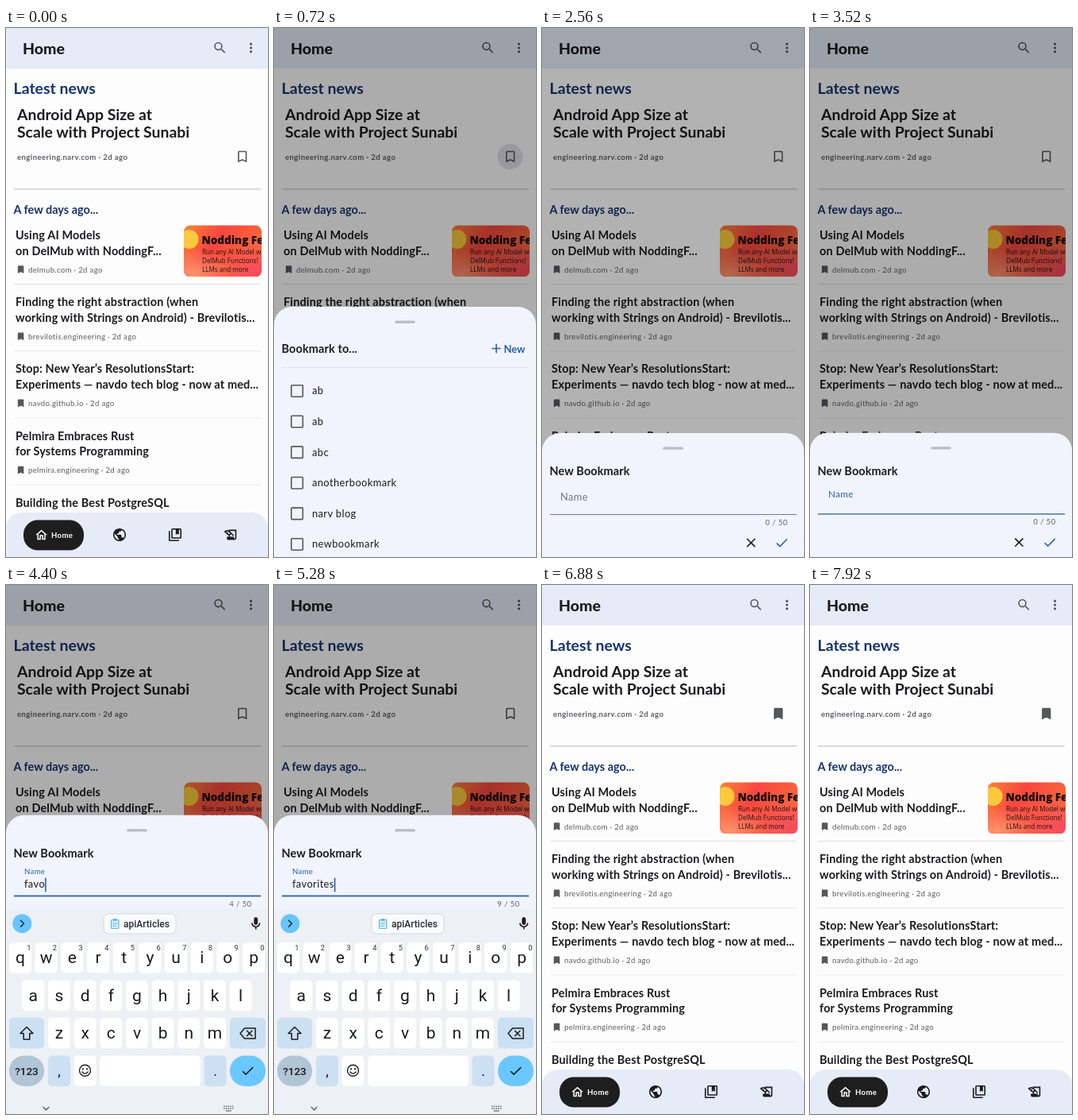
Animation, 330 px wide and 666 px high, one loop 8 s. Source, as an HTML page:

```html
<!DOCTYPE html>
<html lang="en">
<head>
<meta charset="utf-8">
<title>Bookmark flow</title>
<style>
  html, body { margin: 0; width: 100%; height: 100%; overflow: hidden; background: #fdfdfd; }
  svg { display: block; width: 330px; height: 666px; }
  text { font-family: Lato, sans-serif; white-space: pre; }
  .kb text { font-family: Roboto, sans-serif; }
  .card text { font-family: "Open Sans", "Noto Sans", sans-serif; }
</style>
</head>
<body>
<svg id="stage" viewBox="0 0 330 666" xmlns="http://www.w3.org/2000/svg"></svg>
<script>
const LOOP = 8000;
const INK = '#1b1b1e', NAVY = '#17336c', BLUE = '#2a5fac', GREY = '#56575b', SHEET = '#f1f4fc';
const U = 0.804; // pixels per layout unit

const ICON = {
  search: 'M15.5 14h-.79l-.28-.27A6.47 6.47 0 0 0 16 9.5 6.5 6.5 0 1 0 9.5 16c1.61 0 3.09-.59 4.23-1.57l.27.28v.79l5 4.99L20.49 19l-4.99-5zm-6 0a4.5 4.5 0 1 1 0-9 4.5 4.5 0 0 1 0 9z',
  more: 'M12 8a2 2 0 1 0 0-4 2 2 0 0 0 0 4zm0 2a2 2 0 1 0 0 4 2 2 0 0 0 0-4zm0 6a2 2 0 1 0 0 4 2 2 0 0 0 0-4z',
  mark: 'M17 3H7c-1.1 0-2 .9-2 2v16l7-3 7 3V5c0-1.1-.9-2-2-2z',
  markLine: 'M17 3H7c-1.1 0-2 .9-2 2v16l7-3 7 3V5c0-1.1-.9-2-2-2zm0 15l-5-2.18L7 18V5h10z',
  home: 'M12 5.69l5 4.5V18h-2v-6H9v6H7v-7.81l5-4.5M12 3L2 12h3v8h6v-6h2v6h6v-8h3L12 3z',
  globe: 'M12 2C6.48 2 2 6.48 2 12s4.48 10 10 10 10-4.48 10-10S17.52 2 12 2zm-1 17.93c-3.95-.49-7-3.85-7-7.93 0-.62.08-1.21.21-1.79L9 15v1c0 1.1.9 2 2 2v1.93zm6.9-2.54c-.26-.81-1-1.39-1.9-1.39h-1v-3c0-.55-.45-1-1-1H8v-2h2c.55 0 1-.45 1-1V7h2c1.1 0 2-.9 2-2v-.41c2.93 1.19 5 4.06 5 7.41 0 2.08-.8 3.97-2.1 5.39z',
  shelf: 'M4 6H2v14c0 1.1.9 2 2 2h14v-2H4zM20 2H8c-1.1 0-2 .9-2 2v12c0 1.1.9 2 2 2h12c1.1 0 2-.9 2-2V4c0-1.1-.9-2-2-2zM20 16H8V4h12zM13 4h5v8l-2.5-1.5L13 12z',
  scroll: 'M9 4v1.38c-.83-.33-1.72-.5-2.61-.5-1.79 0-3.58.68-4.95 2.05l3.33 3.33h1.11v1.11c.86.86 1.98 1.31 3.11 1.36V15H6v3c0 1.1.9 2 2 2h10c1.66 0 3-1.34 3-3V4H9zm-1.11 6.41V8.26H5.61L4.57 7.22a5.07 5.07 0 0 1 1.82-.34c1.34 0 2.59.52 3.54 1.46l1.41 1.41-.2.2a2.7 2.7 0 0 1-1.92.8c-.47 0-.93-.12-1.33-.34zM19 17c0 .55-.45 1-1 1s-1-.45-1-1v-2h-6v-2.59c.57-.23 1.1-.57 1.56-1.03l.2-.2L15.59 14H17v-1.41l-6-5.97V6h8v11z',
  close: 'M19 6.41L17.59 5 12 10.59 6.41 5 5 6.41 10.59 12 5 17.59 6.41 19 12 13.41 17.59 19 19 17.59 13.41 12z',
  check: 'M9 16.17L4.83 12l-1.42 1.41L9 19 21 7l-1.41-1.41z',
  plus: 'M19 13h-6v6h-2v-6H5v-2h6V5h2v6h6z',
  mic: 'M12 14c1.66 0 3-1.34 3-3V5a3 3 0 0 0-6 0v6c0 1.66 1.34 3 3 3zm5-3c0 2.76-2.24 5-5 5s-5-2.24-5-5H5c0 3.53 2.61 6.43 6 6.92V21h2v-3.08c3.39-.49 6-3.39 6-6.92z',
  down: 'M7.41 8.59L12 13.17l4.59-4.58L18 10l-6 6-6-6z'
};

const rect = (x, y, w, h, r, fill, more = '') =>
  `<rect x="${x}" y="${y}" width="${w}" height="${h}" rx="${r}" fill="${fill}" ${more}/>`;
const text = (s, x, y, size, weight, fill, ls = 0, more = '') =>
  `<text x="${x}" y="${y}" font-size="${size}" font-weight="${weight}" fill="${fill}" letter-spacing="${ls}" ${more}>${s}</text>`;
const icon = (name, cx, cy, fill, s = U, more = '') =>
  `<path d="${ICON[name]}" fill="${fill}" fill-rule="evenodd" transform="translate(${cx - 12 * s} ${cy - 12 * s}) scale(${s})" ${more}/>`;
const stroke = (d, color, w) =>
  `<path d="${d}" fill="none" stroke="${color}" stroke-width="${w}" stroke-linejoin="round" stroke-linecap="round"/>`;
const rule = (y, color, h = 1, more = '') => rect(10, y, 311, h, 0, color, more);
const MID = 'text-anchor="middle"';

function card() {
  const line = (s, y) => text(s, 247, y, 8.1, 400, '#241010');
  return `<g class="card" clip-path="url(#cardClip)">
    ${rect(224, 248, 98, 65, 0, 'url(#warm)')}
    ${rect(224, 248, 98, 65, 0, 'url(#rose)')}
    ${rect(224, 248, 98, 65, 0, 'url(#glow)')}
    <circle cx="230.5" cy="266" r="12" fill="#fcc93c"/>
    ${text('Nodding Fern', 246.5, 272, 13.5, 800, '#150a0a')}
    ${line('Run any AI Model with', 285)}${line('DelMub Functions!', 296)}${line('LLMs and more', 307)}
  </g>`;
}

function page() {
  const items = [
    ['Using AI Models', 'on DelMub with NoddingF...', 'delmub.com'],
    ['Finding the right abstraction (when', 'working with Strings on Android) - Brevilotis...', 'brevilotis.engineering'],
    ['Stop: New Year’s ResolutionsStart:', 'Experiments — navdo tech blog - now at med...', 'navdo.github.io'],
    ['Pelmira Embraces Rust', 'for Systems Programming', 'pelmira.engineering'],
    ['Building the Best PostgreSQL', '', '']
  ];
  const list = items.map(([a, b, site], i) => {
    const y = 266 + 84.2 * i;
    const title = (s, dy) => text(s, 12, y + dy, 14.47, 700, INK, 0.15);
    return title(a, 0) + (b && title(b, 19.5) + icon('mark', 18.6, y + 38, GREY, 0.536) +
      text(site + ' · 2d ago', 28, y + 41.5, 9.65, 400, '#5c5d61', 0.32) +
      rule(y + 56, i ? '#ebebed' : '#dedee1'));
  }).join('');
  return rect(0, 0, 330, 666, 0, '#fdfdfd') + rect(0, 0, 330, 51, 0, '#e5ebf7') +
    text('Home', 21, 32.5, 19.5, 800, INK) +
    icon('search', 269.5, 25, GREY) + icon('more', 308.5, 25, GREY) +
    text('Latest news', 9.5, 83, 19.5, 700, NAVY) +
    text('Android App Size at', 14, 116, 19.4, 700, INK) +
    text('Scale with Project Sunabi', 14, 138, 19.4, 700, INK) +
    text('engineering.narv.com · 2d ago', 14, 165.5, 9.65, 700, '#5c5d61', 0.4) +
    '<circle id="ripple" cx="297.5" cy="162" r="16" fill="#1c1c30"/>' +
    icon('markLine', 297.7, 162, GREY, U, 'id="markOff"') + icon('mark', 297.7, 162, GREY, U, 'id="markOn"') +
    rule(202, '#d3d3d7', 1.6) + text('A few days ago...', 9.5, 234, 14.47, 700, NAVY) + list + card();
}

function navBar() {
  return `<path d="M0 666V630a20 20 0 0 1 20-20H310a20 20 0 0 1 20 20V666z" fill="#e5ebf7"/>` +
    rect(22, 619.5, 76, 38, 18, '#1e1e1f') + icon('home', 44.6, 638.3, '#fff', 0.74) +
    text('Home', 57, 642, 9.65, 700, '#fff', 0.3) +
    icon('globe', 143, 638, INK) + icon('shelf', 213, 638, INK) + icon('scroll', 283, 638, INK);
}

// Sheets are drawn with their top edge at y = 0.
const sheetBase = rect(0, 0, 330, 760, 22.5, SHEET) + rect(152.2, 17.5, 25.7, 3.2, 1.6, '#b9bbc2');

function pickSheet() {
  const rows = ['ab', 'ab', 'abc', 'anotherbookmark', 'narv blog', 'newbookmark'].map((s, i) => {
    const y = 106 + 38.6 * i;
    return rect(21.8, y - 7.3, 14.5, 14.5, 1, 'none', `stroke="${GREY}" stroke-width="1.6"`) +
      text(s, 48, y + 4.3, 12.86, 400, INK, 0.4);
  }).join('');
  return sheetBase + text('Bookmark to...', 9.5, 58, 14.47, 700, INK, 0.12) + icon('plus', 280, 52.5, BLUE) +
    text('New', 289.5, 57.5, 12.86, 700, BLUE) + rule(76, '#e0e2e9') + rows;
}

function newSheet() {
  return sheetBase + text('New Bookmark', 9.5, 53.2, 14.47, 700, INK, 0.12) +
    text('Name', 23, 85, 12.86, 400, '#74767c', 0.4, 'id="label"') +
    text('', 23, 91.5, 12.86, 400, INK, 0.4, 'id="typed"') +
    rect(48, 79, 1.6, 17.5, 0, BLUE, 'id="caret"') +
    rule(102, '#77797e', 1, 'id="line"') +
    text('', 309.3, 115.7, 9.65, 400, '#626368', 0.32, 'id="count" text-anchor="end"') +
    icon('close', 263.3, 138, INK) + icon('check', 302, 138, BLUE);
}

// The keyboard is drawn where it rests when open.
function keyboard() {
  const soft = '#cce0f3', pitch = 32.67;
  const key = (x, y, w, fill = '#fff', r = 5) => rect(x, y, w, 38.5, r, fill);
  const row = (letters, x0, y, digits) => [...letters].map((c, i) => {
    const x = x0 + pitch * i;
    return key(x - 14, y, 28) + text(c, x, y + 26, 21, 400, INK, 0, MID) +
      (digits ? text((i + 1) % 10, x + 10.8, y + 10.3, 9.3, 400, '#333', 0, MID) : '');
  }).join('');
  const top = rect(0, 408, 330, 258, 0, '#edf0f5') +
    '<circle cx="20.3" cy="426.3" r="12" fill="#68c5fb"/>' + stroke('M18.5 422.3l4 4-4 4', '#1d2a33', 1.5) +
    rect(123, 414, 91, 25, 6, '#fafbfd', 'stroke="#d3d8de" stroke-width="1"') +
    rect(132.5, 421.5, 9.5, 11, 1, '#d3edfc', 'stroke="#6ab8e2" stroke-width="1.2"') +
    rect(134.7, 420, 5, 3, 1, '#6ab8e2') + stroke('M134.8 426h5M134.8 429h3.5', '#6ab8e2', 1) +
    text('apiArticles', 148, 431, 12, 500, '#2a2c30') + icon('mic', 314.7, 426.3, INK);
  const keys = row('qwertyuiop', 18, 450, true) + row('asdfghjkl', 34.3, 497.5) + row('zxcvbnm', 67, 545);
  const third = key(4, 545, 44, soft) + stroke('M26 556.5l8 8h-4.2v7.5h-7.6v-7.5H18z', INK, 1.5) +
    key(282, 545, 45, soft) + stroke('M300.5 558H314v13h-13.5l-5.5-6.5zM303.5 561.3l6.4 6.4M309.9 561.3l-6.4 6.4', INK, 1.5);
  const last = key(4, 592.5, 44, '#b0c5d6', 19) + text('?123', 26, 617, 13.5, 500, INK, 0, MID) +
    key(53, 592.5, 28, soft) + text(',', 67, 618, 18, 400, INK, 0, MID) +
    key(85.5, 592.5, 28) + `<circle cx="99.5" cy="611.3" r="7" fill="none" stroke="${INK}" stroke-width="1.4"/>` +
    `<circle cx="97" cy="609.3" r="1.1" fill="${INK}"/><circle cx="102" cy="609.3" r="1.1" fill="${INK}"/>` +
    stroke('M95.8 613q3.7 4.4 7.4 0', INK, 1.3) +
    key(118, 592.5, 127) + key(249.5, 592.5, 28, soft) + text('.', 263.5, 618, 18, 400, INK, 0, MID) +
    key(282, 592.5, 45, '#6bc7ff', 19) + icon('check', 304.5, 611.7, '#12222c');
  const dots = [274, 276.7, 279.4, 282.1, 284.8].map(x =>
    rect(x, 655.5, 1.6, 1.6, 0, '#777') + rect(x, 658.3, 1.6, 1.6, 0, '#777')).join('');
  const foot = icon('down', 50.5, 659, '#666', 0.72) + dots + rect(276.7, 661.3, 7, 1.4, 0, '#777');
  return top + keys + third + last + foot;
}

document.getElementById('stage').innerHTML = `
  <defs>
    <clipPath id="cardClip"><rect x="224" y="248.5" width="98" height="65" rx="8"/></clipPath>
    <linearGradient id="warm" x2="1" y2=".4"><stop stop-color="#fb8438"/><stop offset=".45" stop-color="#f84640"/><stop offset="1" stop-color="#fa6a3c"/></linearGradient>
    <radialGradient id="rose" cx=".95" cy=".9" r=".6"><stop stop-color="#f84a60"/><stop offset="1" stop-color="#f84a60" stop-opacity="0"/></radialGradient>
    <radialGradient id="glow" cx=".12" cy=".95" r=".5"><stop stop-color="#ff946c"/><stop offset="1" stop-color="#ff946c" stop-opacity="0"/></radialGradient>
  </defs>
  <g>${page()}</g><g>${navBar()}</g>
  <rect id="scrim" width="330" height="666"/>
  <g id="pick">${pickSheet()}</g>
  <g id="create">${newSheet()}</g>
  <g id="keys" class="kb">${keyboard()}</g>`;

const el = {};
document.querySelectorAll('#stage [id]').forEach(n => el[n.id] = n);
const set = (n, attrs) => { for (const k in attrs) n.setAttribute(k, attrs[k]); };
const show = (n, on) => n.setAttribute('visibility', on ? 'inherit' : 'hidden');

const clamp = p => Math.max(0, Math.min(1, p));
const part = (t, start, dur) => clamp((t - start) / dur);
const easeOut = p => 1 - (1 - p) ** 3;
const ease = p => p < 0.5 ? 4 * p ** 3 : 1 - 4 * (1 - p) ** 3;
const mix = (a, b, p) => a + (b - a) * p;

const WORD = 'favorites';
const PICK = { open: 400, close: 1868 };
const NEW = { open: 2300, close: 5978 };
const CLOSE = 180, FOCUS = 3500, SAVED = NEW.close + CLOSE;

// The scrim fades slowly and is removed as soon as its sheet is gone.
function scrimAt(t, { open, close }) {
  if (t < open || t >= close + CLOSE) return 0;
  return 0.32 * part(t, open, 280) - 0.13 * part(t, close, CLOSE);
}

function place(node, t, { open, close }, rest) {
  const y = mix(mix(666, rest, easeOut(part(t, open, 300))), 666, ease(part(t, close, CLOSE)));
  node.setAttribute('transform', `translate(0 ${y.toFixed(2)})`);
  show(node, t >= open && t < close + CLOSE);
}

function draw(t) {
  const rise = ease(part(t, 3560, 280));
  const fall = ease(part(t, 6220, 280));
  const focus = easeOut(part(t, FOCUS, 150));
  const typed = Math.max(0, Math.min(WORD.length, Math.floor((t - 3930) / 140) + 1));

  set(el.ripple, { opacity: 0.12 * part(t, 280, 120) * (1 - part(t, 760, 160)), r: mix(8, 16, easeOut(part(t, 280, 200))) });
  show(el.markOff, t < SAVED);
  show(el.markOn, t >= SAVED);

  el.scrim.setAttribute('opacity', scrimAt(t, PICK) + scrimAt(t, NEW));
  place(el.pick, t, PICK, 351);
  place(el.create, t, NEW, mix(509.7, 289.8, rise));

  set(el.label, {
    y: mix(85, 74.5, focus), 'font-size': mix(12.86, 9.65, focus),
    'letter-spacing': mix(0.4, 0.32, focus), fill: focus ? BLUE : '#74767c'
  });
  set(el.line, { y: mix(102, 100.8, focus), height: mix(1, 1.8, focus), fill: focus ? BLUE : '#77797e' });
  el.typed.textContent = WORD.slice(0, typed);
  el.count.textContent = typed + ' / 50';
  el.caret.setAttribute('x', 23 + (typed ? el.typed.getComputedTextLength() : 0));
  show(el.caret, focus === 1);

  el.keys.setAttribute('transform', `translate(0 ${258 * (1 - rise + fall)})`);
  show(el.keys, rise > 0 && fall < 1);
}

const start = performance.now();
function tick() {
  draw((performance.now() - start) % LOOP);
  requestAnimationFrame(tick);
}
tick();
</script>
</body>
</html>
```
